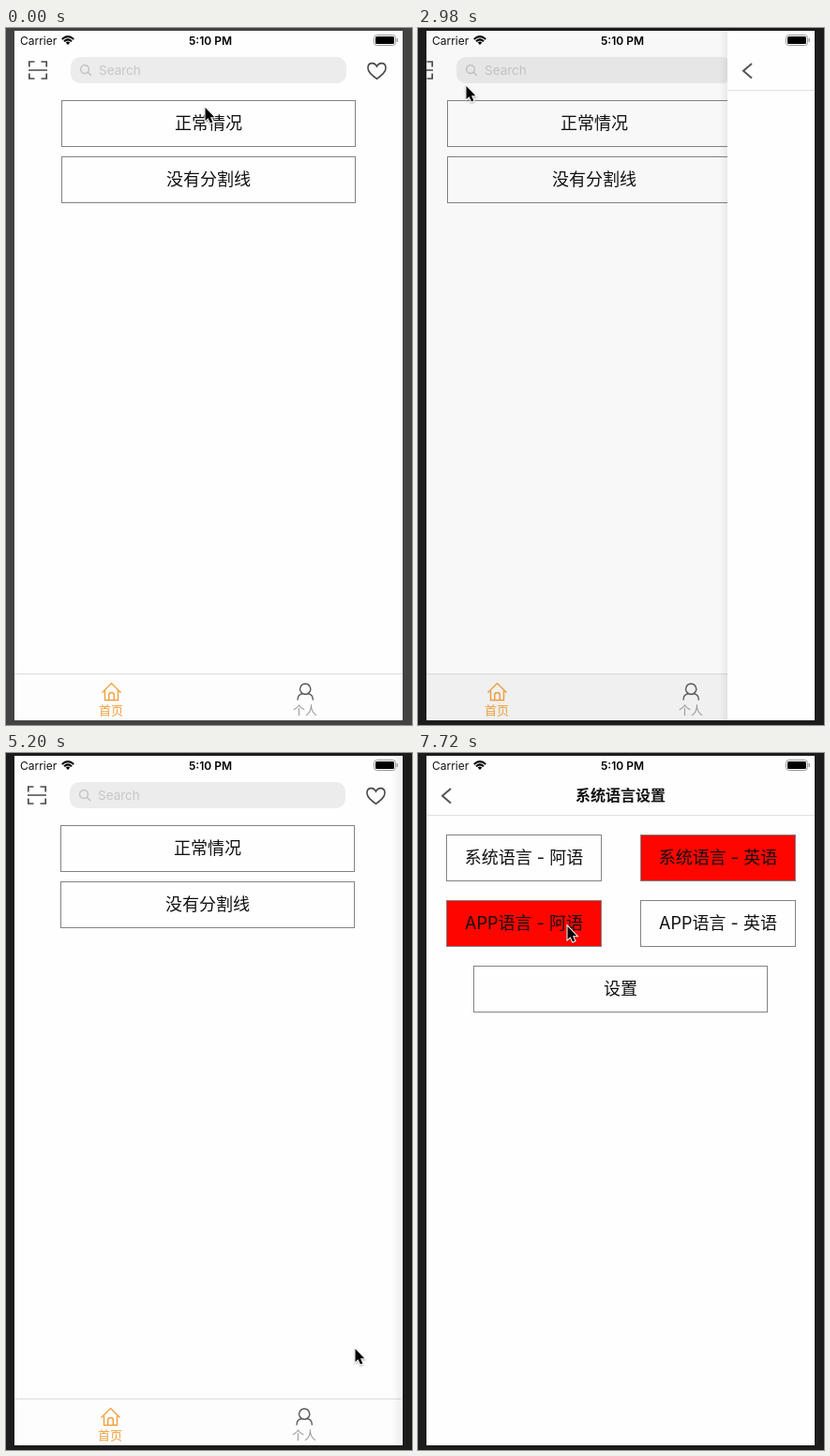
These frames come from a looping animation (433 by 744 pixels, 8000 ms). An HTML page with a canvas:

```html
<!DOCTYPE html>
<html lang="zh-CN">
<head>
<meta charset="utf-8">
<title>Navigation demo</title>
<style>
html, body { margin: 0; width: 100%; height: 100%; overflow: hidden; background: #1c1c1c; }
canvas { display: block; width: 433px; height: 744px; }
</style>
</head>
<body>
<canvas id="stage"></canvas>
<script>
const canvas = document.getElementById('stage');
const ctx = canvas.getContext('2d');
const ratio = window.devicePixelRatio || 1;
canvas.width = 433 * ratio;
canvas.height = 744 * ratio;

const LOOP = 8000, STEP = 148.5, LAST_STEP = 52;
const LEFT = 9, TOP = 3, W = 414, H = 736;
const PAPER = '#fefefe', INK = '#111', GREY = '#4a4a4a', ORANGE = '#f2a03e';
const FONT = 'Inter, "Noto Sans CJK SC", "Noto Sans CJK", sans-serif';

function text(str, x, y, size, color = INK, align = 'center', weight = 400) {
  ctx.font = `${weight} ${size}px ${FONT}`;
  ctx.textAlign = align;
  ctx.fillStyle = color;
  ctx.fillText(str, x, y);
}

function line(d, color, width = 1.5) {
  ctx.strokeStyle = color;
  ctx.lineWidth = width;
  ctx.stroke(new Path2D(d));
}

function rounded(x, y, w, h, r) {
  ctx.beginPath();
  ctx.roundRect(x, y, w, h, r);
}

function button(label, x, y, w, on) {
  if (on) {
    ctx.fillStyle = '#ff0500';
    ctx.fillRect(x, y, w, 50);
  }
  ctx.strokeStyle = '#838383';
  ctx.lineWidth = 1;
  ctx.strokeRect(x + .5, y + .5, w - 1, 49);
  text(label, x + w / 2, y + 31, 18);
}

function paper() {
  ctx.fillStyle = PAPER;
  ctx.fillRect(LEFT, TOP, W, H);
}

function title(str, size = 16) {
  text(str, 216, 51, size, INK, 'center', 600);
}

function navBar(str, ruled, size) {
  paper();
  line('M35 38 L26 45.7 L35 53.5', '#555', 2);
  if (str) title(str, size);
  if (ruled) {
    ctx.fillStyle = '#e2e2e2';
    ctx.fillRect(LEFT, 66, W, 1);
  }
}

function tabBar(active, moving) {
  ctx.fillStyle = moving ? '#f6f6f6' : '#fdfdfd';
  ctx.fillRect(LEFT, 689, W, 50);
  ctx.fillStyle = '#dcdcdc';
  ctx.fillRect(LEFT, 689, W, 1);
  const icon = i => i === active ? ORANGE : '#5a5a5a';
  const label = i => i === active ? ORANGE : '#999';
  line('M102.5 709.5 L112.5 699.5 L122.5 709.5 M105.5 707.5 V717.5 H119.5 V707.5 ' +
       'M109.7 717.5 V712 Q109.7 709.5 112.5 709.5 Q115.3 709.5 115.3 712 V717.5', icon(0), 1.4);
  line('M319.2 700 a5.6 5.6 0 1 1 -.01 0 M311 717.5 Q311 711.5 316 710.8 ' +
       'M322.4 710.8 Q327.4 711.5 327.4 717.5', icon(1), 1.4);
  text('首页', 112, 733, 13, label(0));
  text('个人', 319, 733, 13, label(1));
}

function home(moving) {
  paper();
  line('M24.8 41.5 V36 H30.5 M37.5 36 H43.2 V41.5 M24.8 48.5 V54 H30.5 ' +
       'M37.5 54 H43.2 V48.5 M24 45 H44', GREY, 1.7);
  rounded(69, 31, 294, 28, 10);
  ctx.fillStyle = '#ececec';
  ctx.fill();
  line('M84 39.5 a4.5 4.5 0 1 1 -.01 0 M87.3 47.3 L91 51', '#c2c2c2', 1.4);
  text('Search', 99, 50, 13.5, '#c6c6c6', 'left');
  line('M395.5 54.3 C390 50 386 47 386 42.7 C386 36.5 393 36 395.5 41 ' +
       'C398 36 405 36.5 405 42.7 C405 47 401 50 395.5 54.3 Z', GREY, 1.6);
  button('正常情况', 59, 77, 314);
  button('没有分割线', 59, 137, 314);
  tabBar(0, moving);
}

function profile(moving) {
  paper();
  title('个人中心');
  button('语言设置', 59, 77, 314);
  tabBar(1, moving);
}

function first() {
  navBar('First VC', true, 15.5);
  text('分享', 381, 51, 16, INK, 'left');
}

function second() {
  navBar('', false);
}

function settings(t) {
  const arabic = t >= 7700;
  navBar('系统语言设置', true);
  button('系统语言 - 阿语', 30, 87, 166, false);
  button('系统语言 - 英语', 237, 87, 166, true);
  button('APP语言 - 阿语', 30, 157, 166, arabic);
  button('APP语言 - 英语', 237, 157, 166, !arabic);
  button('设置', 59, 227, 314);
}

function statusBar() {
  text('Carrier', 15, 17.5, 12, INK, 'left');
  text('5:10 PM', 218, 17.5, 12, '#000', 'center', 600);
  ctx.lineCap = 'butt';
  line('M59.8 11.9 Q66 6.3 72.2 11.9 M62 14.2 Q66 10.6 70 14.2', '#000', 2);
  ctx.fillStyle = '#000';
  ctx.fill(new Path2D('M63.7 15.4 Q66 13.6 68.3 15.4 L66 18 Z'));
  rounded(392.5, 7.5, 23, 11, 3);
  ctx.strokeStyle = '#999';
  ctx.lineWidth = 1;
  ctx.stroke();
  rounded(394, 9, 20, 8, 1.5);
  ctx.fill();
  ctx.fillStyle = '#999';
  ctx.fillRect(416.6, 11, 1.3, 4);
}

// Pushes and pops: start, page, true when pushing
const moves = [
  [1605, first, true],
  [2792.5, first, false],
  [3585.6, second, true],
  [4720, second, false],
  [6638.8, settings, true]
];

// Pointer path: time, x, y
const path = [
  [0, 212, 85], [297, 212, 94], [1187, 212, 94], [1188, 213, 95], [2000, 213, 95],
  [2524, 44, 46], [2822, 44, 46], [2970, 51, 62], [3416, 184, 161], [4009, 184, 161],
  [4603, 40, 47], [4752, 40, 47], [4900, 130, 190], [5197, 372, 636], [5494, 320, 711],
  [5791, 320, 711], [6385, 222, 104], [6980, 222, 104], [7574, 159, 185], [8000, 159, 185]
];

function pointer(t) {
  const i = Math.max(1, path.findIndex(p => p[0] >= t));
  const [a, b] = [path[i - 1], path[i]];
  const f = (t - a[0]) / (b[0] - a[0]);
  ctx.save();
  ctx.translate(Math.round(a[1] + (b[1] - a[1]) * f), Math.round(a[2] + (b[2] - a[2]) * f));
  const arrow = new Path2D('M.5 0 V14 L3.6 11.2 L6 16.6 L8.4 15.5 L6 10.3 H10.3 Z');
  ctx.shadowColor = 'rgba(0,0,0,.3)';
  ctx.shadowBlur = 2 * ratio;
  ctx.shadowOffsetY = ratio;
  ctx.strokeStyle = '#fff';
  ctx.lineWidth = 2;
  ctx.stroke(arrow);
  ctx.shadowColor = 'transparent';
  ctx.fillStyle = '#000';
  ctx.fill(arrow);
  ctx.restore();
}

const rest = ms => (1 + .016 * ms) * Math.exp(-.016 * ms);

function shifted(dx, page, arg) {
  ctx.save();
  ctx.translate(dx, 0);
  page(arg);
  ctx.restore();
}

function pages(t) {
  const base = t < 5780 ? home : profile;
  const move = moves.filter(m => m[0] <= t).pop();
  let x = W;
  if (move) {
    const r = rest(t - move[0]);
    x = Math.round(W * (move[2] ? r : 1 - r));
  }
  const cover = 1 - x / W;
  paper();
  shifted(-Math.round(.3 * (W - x)), base, cover > .01 && cover < .95);
  if (x >= W) return;
  ctx.fillStyle = `rgba(0,0,0,${.1 * cover})`;
  ctx.fillRect(LEFT, TOP, W, H);
  const edge = LEFT + x;
  const shade = ctx.createLinearGradient(edge - 9, 0, edge, 0);
  shade.addColorStop(0, 'rgba(0,0,0,0)');
  shade.addColorStop(1, 'rgba(0,0,0,.06)');
  ctx.fillStyle = shade;
  ctx.fillRect(edge - 9, TOP, 9, H);
  shifted(x, move[1], t);
}

function draw(now) {
  const k = Math.min(LAST_STEP, Math.floor((now % LOOP + 4) / STEP));
  const t = k * STEP;
  ctx.setTransform(ratio, 0, 0, ratio, 0, 0);
  ctx.fillStyle = t < 1600 ? '#434343' : '#1c1c1c';
  ctx.fillRect(0, 0, 433, 744);
  ctx.save();
  ctx.beginPath();
  ctx.rect(LEFT, TOP, W, H);
  ctx.clip();
  pages(t);
  statusBar();
  ctx.restore();
  pointer(t);
}

let origin;
function tick(now) {
  origin ??= now;
  draw(now - origin);
  requestAnimationFrame(tick);
}
requestAnimationFrame(tick);
</script>
</body>
</html>
```
